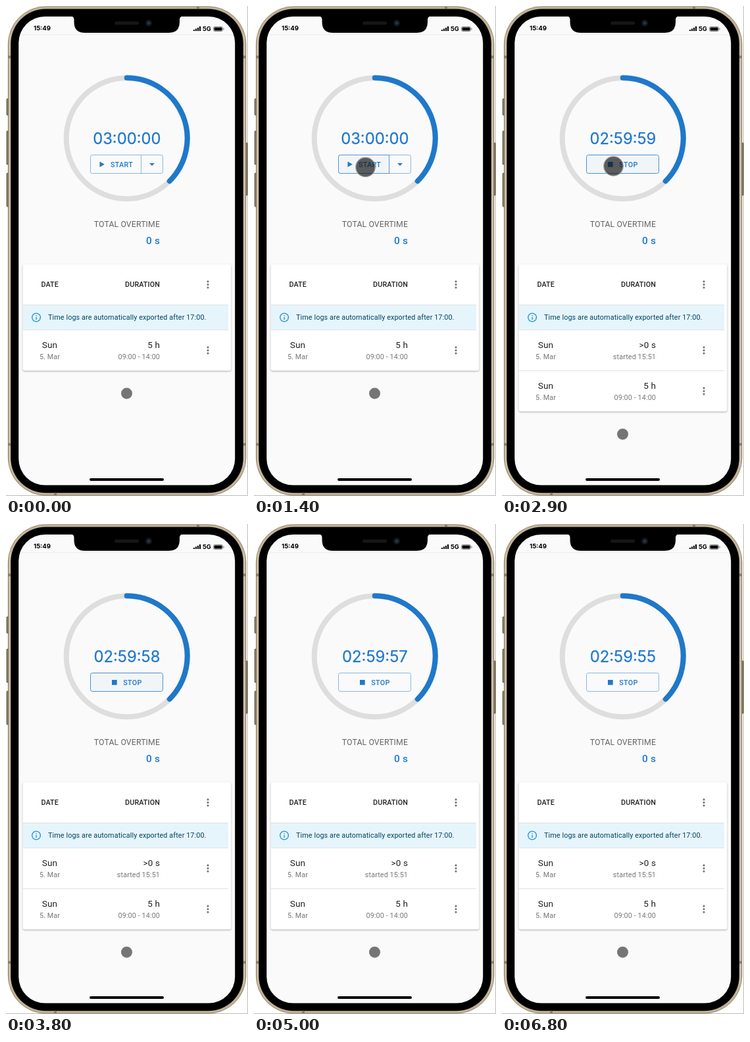
Write an HTML page that moves like this. It is 368x745 px and loops after 7100 ms.

```html
<!DOCTYPE html>
<html lang="en">
<head>
<meta charset="utf-8">
<title>Overtime timer</title>
<style>
  html, body { margin: 0; width: 100%; height: 100%; overflow: hidden; background: #fff; }
  svg { display: block; width: 368px; height: 745px; font-family: Roboto, sans-serif; }
  .sys { font-family: Inter, sans-serif; }
  .mid { text-anchor: middle; }
  .end { text-anchor: end; }
  .clock { font-size: 23.8px; stroke: #1f78cb; stroke-width: .25px; }
  .status { font-size: 9.6px; font-weight: 700; }
  .btn { font-size: 10.77px; font-weight: 500; letter-spacing: .02857em; }
  .head { font-size: 10.77px; font-weight: 500; letter-spacing: .01071em; fill: #212121; }
  .big { font-size: 13.5px; letter-spacing: .00938em; fill: #212121; }
  .small { font-size: 10.77px; letter-spacing: .01071em; fill: #757575; }
  .blue { fill: #1f78cb; }
  .edge { fill: none; stroke: #1f78cb; }
  .rule { stroke: #e0e0e0; }
  .paper { filter: drop-shadow(0 1px 1.2px rgba(0,0,0,.32)); }
</style>
</head>
<body>
<svg viewBox="0 0 368 745">
  <defs>
    <linearGradient id="gold" x2="1" y2="0">
      <stop offset="0" stop-color="#8d8069"/><stop offset=".005" stop-color="#d8cab0"/>
      <stop offset=".012" stop-color="#c2b396"/><stop offset=".988" stop-color="#c2b396"/>
      <stop offset=".995" stop-color="#d8cab0"/><stop offset="1" stop-color="#8d8069"/>
    </linearGradient>
    <clipPath id="screen"><rect x="19.2" y="16" width="329" height="712.5" rx="40"/></clipPath>
    <g id="dots" fill="#757575">
      <circle cy="-4.6" r="1.55"/><circle r="1.55"/><circle cy="4.6" r="1.55"/>
    </g>
  </defs>

  <!-- phone body -->
  <path d="M367.5 0V744.5H0" fill="none" stroke="#bbb"/>
  <g fill="#8a7e67" stroke="#4a4438" stroke-width=".7">
    <rect x="1" y="141" width="3.500" height="25" rx="1"/>
    <rect x="1" y="190" width="3.500" height="51" rx="1"/>
    <rect x="1" y="254" width="3.500" height="51" rx="1"/>
    <rect x="363.500" y="208" width="3.500" height="80" rx="1"/>
  </g>
  <rect x="3.300" y=".8" width="361.600" height="743.200" rx="57" fill="url(#gold)" stroke="#7d715b" stroke-width=".7"/>
  <path d="M3 77.500H7M361 77.500H365M3 666.500H7M361 666.500H365M292 1V4M75 741V744" stroke="#8a7d66" stroke-width="4"/>
  <rect x="7.200" y="4.500" width="353.600" height="735.700" rx="53"/>

  <g clip-path="url(#screen)">
    <rect x="19" y="15" width="330" height="714" fill="#fafafa"/>
    <path d="M19 43.500H349" stroke="#ececec"/>
  </g>
  <path d="M99 15.500Q103.500 16 103.500 21V24.500Q103.500 40.700 120 40.700H247.500Q264 40.700 264 24.500V21Q264 16 268.500 15.500Z"/>
  <rect x="165" y="23.500" width="37" height="5" rx="2.500" fill="#161617"/>
  <circle cx="217" cy="26" r="5" fill="#12181f"/>
  <circle cx="217" cy="26" r="2.300" fill="#173d4b"/>

  <text class="sys status" x="42" y="37">15:49</text>
  <path d="M286 36V38M289 34.500V38M292 33V38M295 31V38" stroke="#000" stroke-width="2"/>
  <text class="sys status" x="299" y="37.500" style="font-size:9.300px">5G</text>
  <rect x="315.500" y="31.500" width="14" height="7" rx="2" fill="none" stroke="#777" stroke-width=".8"/>
  <rect x="316.500" y="32.500" width="12" height="5" rx="1"/>
  <path d="M331 33.500V36.500" stroke="#777"/>

  <!-- dial -->
  <g transform="translate(183.700 201.200)">
    <circle r="92" fill="none" stroke="#dedede" stroke-width="8"/>
    <path d="M0 -92A92 92 0 0 1 65.050 65.050" class="edge" stroke-width="8" stroke-linecap="round"/>
  </g>
  <text id="clock" class="sys clock blue mid" x="183.900" y="209.500"></text>

  <g id="start">
    <path id="startBg" class="blue" d="M205.500 227H132a3 3 0 0 0 -3 3V252a3 3 0 0 0 3 3H205.500Z"/>
    <path id="menuBg" class="blue" d="M205.500 227H236a3 3 0 0 1 3 3V252a3 3 0 0 1 -3 3H205.500Z"/>
    <rect class="edge" x="128.500" y="226.500" width="110" height="28" rx="3" stroke-opacity=".5"/>
    <path class="edge" d="M205.500 227V255" stroke-opacity=".5"/>
    <path id="startEdge" class="edge" d="M205.500 226.500H131.500a3 3 0 0 0 -3 3V251.500a3 3 0 0 0 3 3H205.500Z"/>
    <path class="blue" d="M142.500 236.500V245L149.800 240.750Z"/>
    <text class="btn blue" x="159" y="244.500">START</text>
    <path class="blue" d="M218 239H226L222 243Z"/>
  </g>
  <g id="stop">
    <rect id="stopBg" class="blue" x="128.500" y="226.500" width="110" height="28" rx="3"/>
    <rect id="stopEdge" class="edge" x="128.500" y="226.500" width="110" height="28" rx="3"/>
    <rect class="blue" x="161" y="237" width="7.700" height="7.700"/>
    <text class="btn blue" x="178.300" y="244.500">STOP</text>
  </g>

  <text class="end" x="234" y="336" style="font-size:12.300px;letter-spacing:.00938em" fill="#666">TOTAL OVERTIME</text>
  <text class="end blue" x="234" y="361.700" style="font-size:15.400px;font-weight:500;letter-spacing:.0075em">0 s</text>

  <!-- time log -->
  <rect id="paper" class="paper" x="25.500" y="392.500" width="316.800" rx="3" fill="#fff"/>
  <text class="head mid" x="66.700" y="426.800">DATE</text>
  <text class="head end" x="234" y="426.800">DURATION</text>
  <use href="#dots" x="307" y="423.500"/>
  <rect x="26" y="454" width="312" height="39" fill="#e6f5fc"/>
  <path class="rule" d="M26 454.500H338M26 492.500H338"/>
  <g fill="none" stroke="#2b94d3" stroke-width="1.400">
    <circle cx="46" cy="473.500" r="6.350"/>
    <path d="M46 472.800V477M46 469.900V471.300"/>
  </g>
  <text class="small" x="64" y="476.800" style="fill:#014361">Time logs are automatically exported after 17:00.</text>
  <g id="rows"></g>
  <circle id="mark" cx="183.500" r="8.500" fill="#757575"/>

  <rect x="127" y="718" width="113" height="4" rx="2"/>
  <circle id="cursor" r="14.700" fill="#111" fill-opacity=".68" stroke="#999" stroke-opacity=".9" stroke-width="1.300"/>
</svg>
<script>
const LOOP = 7100, STEP = 100, PRESS = 1700, ROW = 62;
const $ = id => document.getElementById(id);
const set = (id, attrs) => {
  for (const name in attrs) $(id).setAttribute(name, attrs[name]);
};
const show = (id, on) => { $(id).style.display = on ? '' : 'none'; };

const row = (id, total, detail) => `<g id="${id}">
  <text class="big mid" x="66.5" y="520.2">Sun</text>
  <text class="small mid" x="66.5" y="536.7">5. Mar</text>
  <text class="big end" x="234" y="520.2">${total}</text>
  <text class="small end" x="234" y="536.7">${detail}</text>
  <use href="#dots" x="307" y="523.5"/></g>`;
$('rows').innerHTML = row('live', '&gt;0 s', 'started 15:51') + row('done', '5 h', '09:00 - 14:00');
$('live').insertAdjacentHTML('beforeend', '<path class="rule" d="M26 554.500H338"/>');

// Linear interpolation through [time, value] keys
function track(t, keys) {
  if (t <= keys[0][0]) return keys[0][1];
  for (let i = 1; i < keys.length; i++) {
    const [a, u] = keys[i - 1], [b, v] = keys[i];
    if (t < b) return u + (v - u) * (t - a) / (b - a);
  }
  return keys[keys.length - 1][1];
}
const pathX = [[900, 276], [1000, 249], [1100, 221], [1200, 194], [1300, 176], [1400, 169.5]];
const pathY = [[900, 279], [1000, 263], [1100, 251], [1200, 247], [1300, 245.5], [1400, 245], [1700, 243.5]];
const menuHover = [[1000, 0], [1100, .3], [1200, .6], [1300, .2], [1400, 0]];
const mainHover = [[1200, 0], [1400, 1], [4700, 1], [5000, 0]];

const pad = n => String(n).padStart(2, '0');
function clock(s) {
  return [s / 3600, s / 60 % 60, s % 60].map(v => pad(Math.floor(v))).join(':');
}

function draw(now) {
  const t = Math.floor(now % LOOP / STEP) * STEP;
  const running = t >= PRESS;
  const shift = running ? ROW : 0;
  const hover = track(t, mainHover);

  $('clock').textContent = clock(10800 - (running ? Math.floor((t - PRESS) / 1000) : 0));
  show('start', !running);
  show('stop', running);
  show('live', running);
  set('startBg', { 'fill-opacity': .04 * hover });
  set('menuBg', { 'fill-opacity': .04 * track(t, menuHover) });
  set('startEdge', { 'stroke-opacity': .5 * hover });
  set('stopBg', { 'fill-opacity': .04 * hover });
  set('stopEdge', { 'stroke-opacity': .5 + .3 * hover });
  set('done', { transform: `translate(0 ${shift})` });
  set('paper', { height: 162 + shift });
  set('mark', { cy: 589 + shift });
  show('cursor', t >= 900 && t < 3500);
  set('cursor', { cx: track(t, pathX), cy: track(t, pathY) });
}

const begin = performance.now();
function loop() {
  draw(performance.now() - begin);
  requestAnimationFrame(loop);
}
loop();
</script>
</body>
</html>
```
